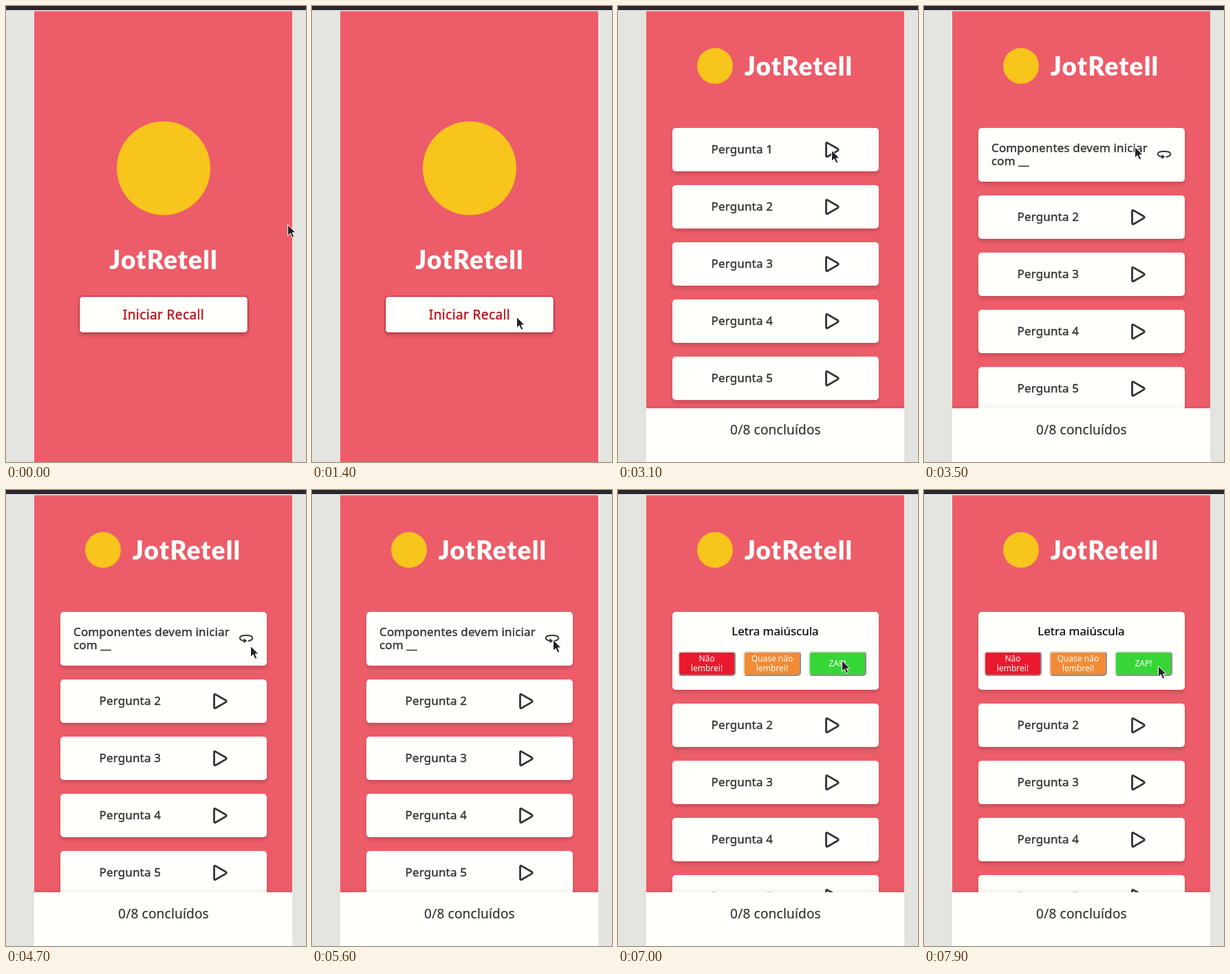
These frames come from a looping animation (436 by 662 pixels, 8 s). An HTML page:

```html
<!DOCTYPE html>
<html lang="pt">
<head>
<meta charset="utf-8">
<title>JotRetell</title>
<style>
  html, body { margin: 0; width: 100%; height: 100%; overflow: hidden; background: #e4e5e0; }
  svg { display: block; width: 436px; height: 662px; }
  text { font-family: "Noto Sans", "Open Sans", sans-serif; fill: #333; }
  .brand { font: 900 37px Lato, sans-serif; letter-spacing: 1.2px; fill: #fffffc; }
  .mid { text-anchor: middle; }
  .label { font-size: 17px; letter-spacing: .15px; stroke: #333; stroke-width: .4px; }
  .start { font-size: 19px; letter-spacing: .4px; fill: #b80a12; stroke: #b80a12; stroke-width: .3px; }
  .count { font-size: 19px; letter-spacing: .2px; stroke: #333; stroke-width: .2px; }
  .answer { font-size: 17px; fill: #000; stroke: #000; stroke-width: .2px; }
  .choice { font-size: 12px; fill: #fffffc; }
  .panel { fill: #fffffc; filter: url(#drop); }
  .icon { fill: none; stroke: #333; stroke-linejoin: round; stroke-linecap: round; }
</style>
</head>
<body>
<svg viewBox="0 0 436 662">
  <defs>
    <filter id="drop" x="-10%" y="-20%" width="120%" height="150%">
      <feDropShadow dx="0" dy="4" stdDeviation="2.5" flood-color="#000" flood-opacity=".15"/>
    </filter>
    <filter id="lift" x="-5%" y="-20%" width="110%" height="140%">
      <feDropShadow dx="0" dy="-4" stdDeviation="3" flood-color="#000" flood-opacity=".05"/>
    </filter>
    <linearGradient id="bevel" x1="0" y1="0" x2="1" y2="1">
      <stop offset=".5" stop-color="#dcdcd8"/>
      <stop offset=".5" stop-color="#8e8e8e"/>
    </linearGradient>
    <path id="play" class="icon" stroke-width="2.8"
          d="M302.5 200v17q0 2.6 2.2 1.4l14.6-8.3q2-1.4 0-2.8l-14.6-8.4q-2.2-1.2-2.2 1.1z"/>
  </defs>

  <rect width="436" height="662" fill="#e4e5e0"/>
  <rect width="436" height="6" fill="#2a2731"/>
  <rect y="6" width="436" height="1" fill="#f0f0ed"/>
  <rect x="40" y="7" width="377" height="655" fill="#f0eae7"/>
  <rect x="41" y="7.500" width="375" height="655" fill="#ed5c69"/>

  <g id="home">
    <circle cx="229" cy="235.5" r="68" fill="#f8c51c"/>
    <text class="brand mid" x="229" y="382">JotRetell</text>
    <rect class="panel" x="106.5" y="421.5" width="245" height="53" rx="5" stroke="#b80a12"/>
    <text class="start mid" x="229" y="455">Iniciar Recall</text>
  </g>

  <g id="deck">
    <circle cx="141" cy="87" r="26" fill="#f8c51c"/>
    <text class="brand mid" x="262.5" y="101">JotRetell</text>
    <rect id="first" class="panel" x="79" y="177" width="300" height="63" rx="5"/>
    <g id="closed">
      <text class="label" x="135.5" y="214">Pergunta 1</text>
      <use href="#play"/>
    </g>
    <g id="question">
      <text class="label" x="98" y="212">Componentes devem iniciar</text>
      <text class="label" x="98" y="231">com __</text>
      <path class="icon" stroke-width="1.9" d="M346 219C337 217.6 337.5 211 349 211S361 217.6 352.5 219"/>
      <path d="M345.5 215.3l4.8 3.6-4.8 3.4z" fill="#333"/>
    </g>
    <g id="reply">
      <text class="answer mid" x="228.5" y="211">Letra maiúscula</text>
    </g>
    <g id="rest"></g>
    <rect x="41" y="584" width="375" height="78" fill="#fffffc" filter="url(#lift)"/>
    <text class="count mid" x="229" y="622">0/8 concluídos</text>
  </g>

  <path id="cursor" d="M.5 .5V16.5L4.2 13L7 19.2L9.8 17.9L7.1 12H12Z"
        fill="#24222a" stroke="#fffffc" stroke-linejoin="round"/>
</svg>
<script>
  const LOOP = 8000, STEP = 100;
  const OPEN_DECK = 1700, OPEN_CARD = 3300, FLIP_CARD = 6100;
  const HEIGHT = { closed: 63, question: 78, reply: 113 };
  const $ = id => document.getElementById(id);
  const show = (id, on) => $(id).setAttribute("display", on ? "inline" : "none");

  // Each move bends towards "via" and rests at "to".
  const home = [409, 317];
  const moves = [
    { start: 500, end: 1400, via: [345, 525], to: [297, 451] },
    { start: 2300, end: 3100, via: [258, 320], to: [310, 209] },
    { start: 3400, end: 3900, via: [294, 188], to: [340, 247] },
    { start: 4300, end: 4700, via: [348, 248], to: [355, 226] },
    { start: 5400, end: 5600, to: [350, 217] },
    { start: 6700, end: 7000, to: [325, 247] },
    { start: 7600, end: 7900, via: [355, 190], to: [340, 255] }
  ];

  const mix = (a, b, k) => a.map((v, i) => v + (b[i] - v) * k);

  function pointer(t) {
    let at = home;
    for (const { start, end, via, to } of moves) {
      if (t <= start) break;
      const k = Math.min(1, (t - start) / (end - start));
      at = via ? mix(mix(at, via, k), mix(via, to, k), k) : mix(at, to, k);
    }
    return at;
  }

  const card = n => `<g transform="translate(0 ${83 * (n - 1)})">
    <rect class="panel" x="79" y="177" width="300" height="63" rx="5"/>
    <text class="label" x="135.5" y="214">Pergunta ${n}</text>
    <use href="#play"/></g>`;
  $("rest").innerHTML = [2, 3, 4, 5].map(card).join("");

  function choice([color, ...lines], i) {
    const x = 88 + 95 * i, top = 256 - 7 * (lines.length - 1);
    const label = (line, row) =>
      `<text class="choice mid" x="${x + 41}" y="${top + 14 * row}">${line}</text>`;
    return `<rect x="${x}" y="235" width="82" height="34" rx="4"
      fill="${color}" stroke="url(#bevel)" stroke-width="2"/>` + lines.map(label).join("");
  }
  $("reply").innerHTML += [
    ["#eb192f", "Não", "lembrei!"],
    ["#f38b34", "Quase não", "lembrei!"],
    ["#37d637", "ZAP!"]
  ].map(choice).join("");

  function draw(time) {
    const t = Math.floor((time % LOOP) / STEP) * STEP;
    const state = t < OPEN_CARD ? "closed" : t < FLIP_CARD ? "question" : "reply";
    show("home", t < OPEN_DECK);
    show("deck", t >= OPEN_DECK);
    for (const id in HEIGHT) show(id, id === state);
    $("first").setAttribute("height", HEIGHT[state]);
    $("rest").setAttribute("transform", `translate(0 ${HEIGHT[state] - HEIGHT.closed})`);
    const [x, y] = pointer(t).map(Math.round);
    $("cursor").setAttribute("transform", `translate(${x} ${y})`);
  }

  const begin = performance.now();
  function tick() {
    draw(performance.now() - begin);
    requestAnimationFrame(tick);
  }
  tick();
</script>
</body>
</html>
```
